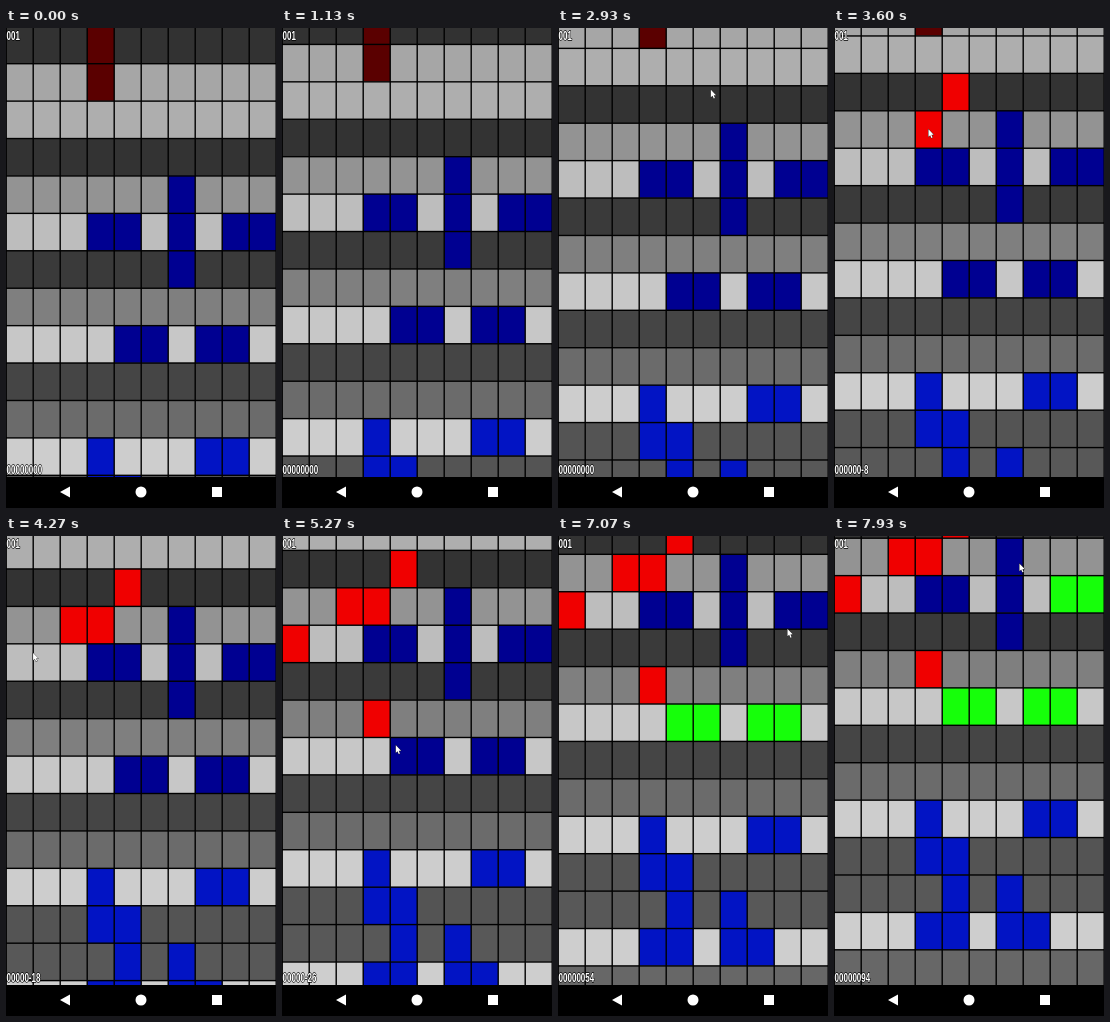
These frames come from a looping animation (270 by 480 pixels, 8000 ms). An HTML page with a canvas:

```html
<!DOCTYPE html>
<html lang="en">
<head>
<meta charset="utf-8">
<title>Scrolling tiles</title>
<style>
  html, body { margin: 0; width: 100%; height: 100%; overflow: hidden; background: #000; }
  canvas { display: block; width: 270px; height: 480px; }
</style>
</head>
<body>
<canvas id="stage" width="270" height="480"></canvas>
<script>
const ctx = document.getElementById('stage').getContext('2d');
const LOOP = 8000, FPS = 15, WIDTH = 270, FLOOR = 449;
const COL = 27, ROW = 37.42, TOP = -1.92;
const MAROON = '#5a0000', NAVY = '#000091', BLUE = '#0214c4';
const RED = '#f00000', GREEN = '#16ff0a';

// Each string lists the coloured columns of one row.
const level = ['3', '3', '', '', '6', '34689', '6', '', '4578', '', '', '378', '34', '46', '3467', ''];
const tileColor = row => row < 2 ? MAROON : row < 10 ? NAVY : BLUE;

// The grey levels follow a wave sampled every 115 degrees.
const grey = row => 128 - 78 * Math.cos((115 * row + 4) * Math.PI / 180);

const scrollAt = t => Math.max(0, 0.0186 * t - 1.8);
const rowTop = (row, t) => TOP + row * ROW - scrollAt(t);

// Time, row and column; the pointer appears at the first entry and taps the rest.
const stops = [
  [2400, 2, 7], [3270, 3, 4], [3600, 4, 3], [3870, 4, 2], [4400, 5, 0],
  [4930, 7, 3], [5400, 8, 4], [6400, 8, 8], [7200, 5, 8], [8100, 4, 6]
].map(([time, row, col]) => ({
  time, row, col,
  x: (col + 0.5) * COL,
  y: rowTop(row, time) + ROW / 2
}));

const taps = stops.slice(1).map(({ time, row, col }) => {
  const filled = c => level[row].includes(c);
  const cols = [col];
  if (filled(col)) {
    for (let c = col - 1; c >= 0 && filled(c); c--) cols.push(c);
    for (let c = col + 1; c < 10 && filled(c); c++) cols.push(c);
  }
  return { time, row, cols, hit: filled(col) };
});

function scoreAt(t, done) {
  const escaped = rowTop(2, t) < 0 ? -6 : 0;
  return done.reduce((sum, tap) => sum + (tap.hit ? 40 : -4), escaped);
}

function polygon(...points) {
  ctx.beginPath();
  points.forEach(([x, y]) => ctx.lineTo(x, y));
  ctx.closePath();
}

function drawGrid(t, done) {
  const fillCells = (row, cols, color) => {
    ctx.fillStyle = color;
    for (const c of cols) ctx.fillRect(c * COL, rowTop(row, t), COL, ROW);
  };
  level.forEach((cols, row) => {
    const g = Math.round(grey(row));
    fillCells(row, '0123456789', `rgb(${g},${g},${g})`);
    fillCells(row, cols, tileColor(row));
  });
  done.forEach(tap => fillCells(tap.row, tap.cols, tap.hit ? GREEN : RED));

  ctx.fillStyle = '#000';
  for (let r = 0; r <= level.length; r++) ctx.fillRect(0, rowTop(r, t) - 0.5, WIDTH, 1.4);
  for (let c = 0; c <= 10; c++) ctx.fillRect(c * COL - 0.5, 0, 1.4, FLOOR);
}

function drawLabel(text, baseline) {
  ctx.save();
  ctx.translate(0.6, baseline);
  ctx.scale(1, 1.55);
  ctx.font = 'bold 8px "Liberation Sans", sans-serif';
  ctx.lineJoin = 'round';
  ctx.lineWidth = 0.9;
  ctx.strokeStyle = '#000';
  ctx.fillStyle = '#fff';
  ctx.strokeText(text, 0, 0);
  ctx.fillText(text, 0, 0);
  ctx.restore();
}

function drawCursor(t) {
  const next = stops.findIndex(s => s.time > t);
  if (next < 1) return;
  const a = stops[next - 1], b = stops[next];
  const k = (t - a.time) / (b.time - a.time);
  ctx.save();
  ctx.translate(a.x + (b.x - a.x) * k, a.y + (b.y - a.y) * k);
  polygon([0, 0], [0, 7.4], [1.7, 5.9], [2.9, 8.7], [4.1, 8.2], [2.9, 5.5], [5.2, 5.4]);
  ctx.lineWidth = 0.8;
  ctx.strokeStyle = '#222';
  ctx.stroke();
  ctx.fillStyle = '#fff';
  ctx.fill();
  ctx.restore();
}

function drawNavBar() {
  ctx.fillStyle = '#000';
  ctx.fillRect(0, FLOOR, WIDTH, 480 - FLOOR);
  ctx.fillStyle = '#fff';
  polygon([54, 464], [64, 458.5], [64, 469.5]);
  ctx.fill();
  ctx.beginPath();
  ctx.arc(135, 464, 5.5, 0, Math.PI * 2);
  ctx.fill();
  ctx.fillRect(206, 459, 10, 10);
}

function draw(now) {
  const frames = LOOP * FPS / 1000;
  const t = Math.floor((now + 4) * FPS / 1000) % frames * 1000 / FPS;
  const done = taps.filter(tap => tap.time <= t);
  drawGrid(t, done);
  drawLabel('001', 11.5);
  drawLabel(String(scoreAt(t, done)).padStart(8, '0'), 445.5);
  drawCursor(t);
  drawNavBar();
}

const start = performance.now();
function tick() {
  draw((performance.now() - start) % LOOP);
  requestAnimationFrame(tick);
}
tick();
</script>
</body>
</html>
```
